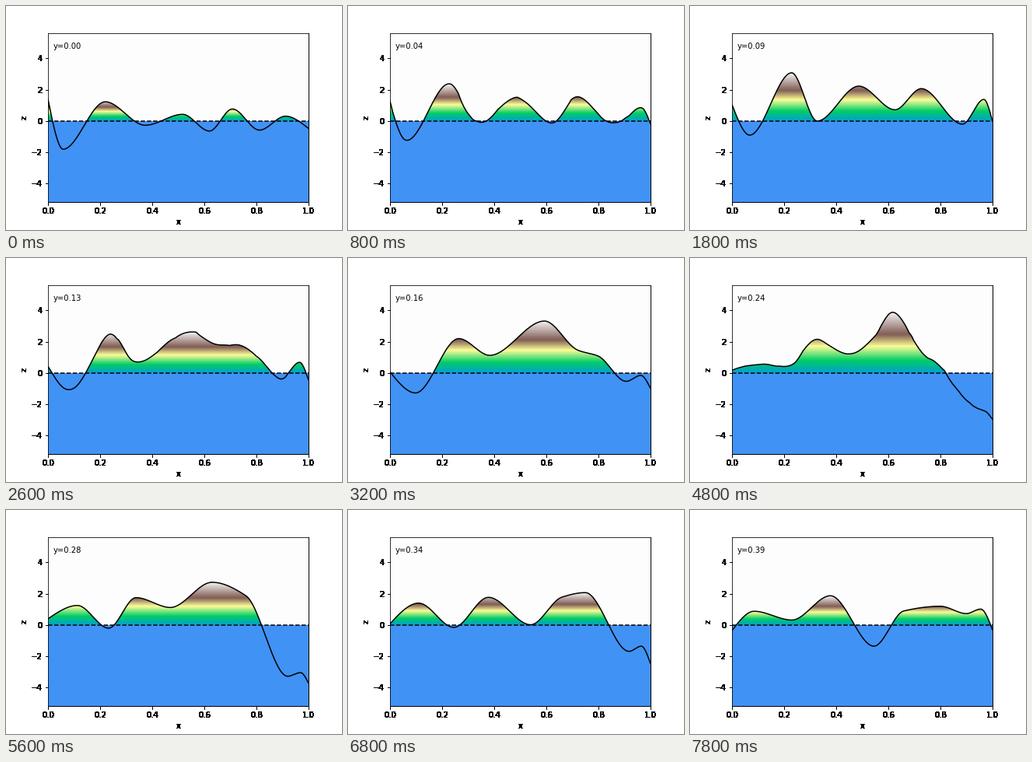
A matplotlib script for the animation above (8000 ms loop, 432 by 288 pixels).

```python
import numpy as np
import matplotlib.pyplot as plt
from matplotlib.animation import FuncAnimation
from matplotlib.collections import PolyCollection
from matplotlib.colors import LinearSegmentedColormap

FRAMES = 40
STEP_MS = 200
BANDS = 50
Z_LIM = (-5.17, 5.63)
SEA = "#4192f5"

LAND = LinearSegmentedColormap.from_list("land", [
    (0.00, "#00a2cc"), (0.20, "#00cc66"), (0.44, "#fdfd98"),
    (0.64, "#805c54"), (1.00, "#f2efee")])

# Hilltops and hollows (x, z) of the terrain along a few slices of y
SLICES = {
    0.00: [(0, 1.4), (.058, -1.8), (.22, 1.23), (.373, -.27), (.517, .43),
           (.62, -.64), (.708, .77), (.812, -.58), (.912, .31), (1, -.47)],
    0.09: [(0, 1.05), (.068, -.9), (.229, 3.08), (.327, 0), (.487, 2.23),
           (.626, .72), (.727, 2.07), (.885, -.2), (.967, 1.38), (1, 0)],
    0.16: [(0, .07), (.098, -1.27), (.264, 2.2), (.383, 1.13), (.593, 3.32),
           (.72, 1.47), (.8, 1.08), (.907, -.53), (.963, -.15), (1, -.97)],
    0.20: [(0, 0), (.098, -.48), (.313, 2.48), (.435, 1.27), (.55, 2.72),
           (.616, 4.57), (.755, .03), (.808, .16), (1, -1.75)],
    0.28: [(0, .4), (.113, 1.25), (.233, -.2), (.338, 1.75), (.47, 1.12),
           (.63, 2.73), (.76, 1.87), (.92, -3.27), (.97, -3.04), (1, -3.7)],
    0.34: [(0, .08), (.11, 1.4), (.245, -.15), (.378, 1.77), (.54, .02),
           (.66, 1.78), (.75, 2.07), (.918, -1.68), (.965, -1.35),
           (1, -2.45)],
    0.39: [(0, -.35), (.085, .88), (.23, .32), (.378, 1.87), (.545, -1.35),
           (.66, .9), (.8, 1.2), (.9, .73), (.955, 1.02), (1, -.3)],
}


def ease(xk, zk, x):
    """Smooth curve that is level at every turning point."""
    h = np.diff(xk)
    d = np.diff(zk) / h
    m = np.zeros(len(xk))
    prod = d[:-1] * d[1:]
    same = prod > 0
    m[1:-1][same] = 2 * prod[same] / (d[:-1] + d[1:])[same]
    m[0] = (3 * d[0] - m[1]) / 2
    m[-1] = (3 * d[-1] - m[-2]) / 2
    k = np.clip(np.searchsorted(xk, x, side="right") - 1, 0, len(h) - 1)
    t = (x - xk[k]) / h[k]
    s = t * t * (3 - 2 * t)
    bend = t * (1 - t) * ((1 - t) * m[k] - t * m[k + 1])
    return zk[k] + s * (zk[k + 1] - zk[k]) + h[k] * bend


xs = np.linspace(0, 1, 401)
ys = np.arange(FRAMES) / 100
keys = np.array(list(SLICES))
ridges = np.array([ease(*np.array(pts).T, xs) for pts in SLICES.values()])
field = np.array([ease(keys, column, ys) for column in ridges.T]).T


def harden(image, dpi):
    """Turn every touched pixel solid black."""
    solid = np.zeros_like(image)
    solid[..., 3] = image[..., 3] > 0
    return solid, 0, 0


plt.rcParams.update({"font.family": "DejaVu Sans", "font.size": 10})
fig = plt.figure(figsize=(6, 4), dpi=72, facecolor="white")
ax = fig.add_axes((0.125, 0.125, 0.775, 0.755), facecolor="#fdfdfd")
ax.set(xlim=(0, 1), ylim=Z_LIM, xlabel="x", ylabel="z",
       yticks=range(-4, 5, 2))
for part in (ax.xaxis, ax.yaxis, ax.spines["bottom"], ax.spines["right"]):
    part.set_agg_filter(harden)

ax.axhspan(Z_LIM[0], 0, color=SEA, lw=0, zorder=1)
land = PolyCollection([], facecolors=LAND(np.linspace(0, 1, BANDS)),
                      linewidths=0, zorder=2)
ax.add_collection(land, autolim=False)
ax.plot([0, 1], [0, 0], "k--", lw=1.5, zorder=2.2)
ridge, = ax.plot([], [], "k-", lw=1.5, zorder=2.3)
label = ax.text(0.02, 4.63, "")


def layer(z, base):
    """Everything between a base level and the ridge."""
    top = np.column_stack([xs, np.maximum(z, base)])
    return np.vstack([top, [(1, base), (0, base)]])


def draw(i):
    z = field[i]
    levels = np.linspace(0, z.max(), BANDS, endpoint=False)
    land.set_verts([layer(z, base) for base in levels])
    ridge.set_data(xs, z)
    label.set_text(f"y={ys[i]:.2f}")
    return land, ridge, label


anim = FuncAnimation(fig, draw, frames=FRAMES, interval=STEP_MS,
                     repeat=True, repeat_delay=0, blit=False)
plt.show()
```
